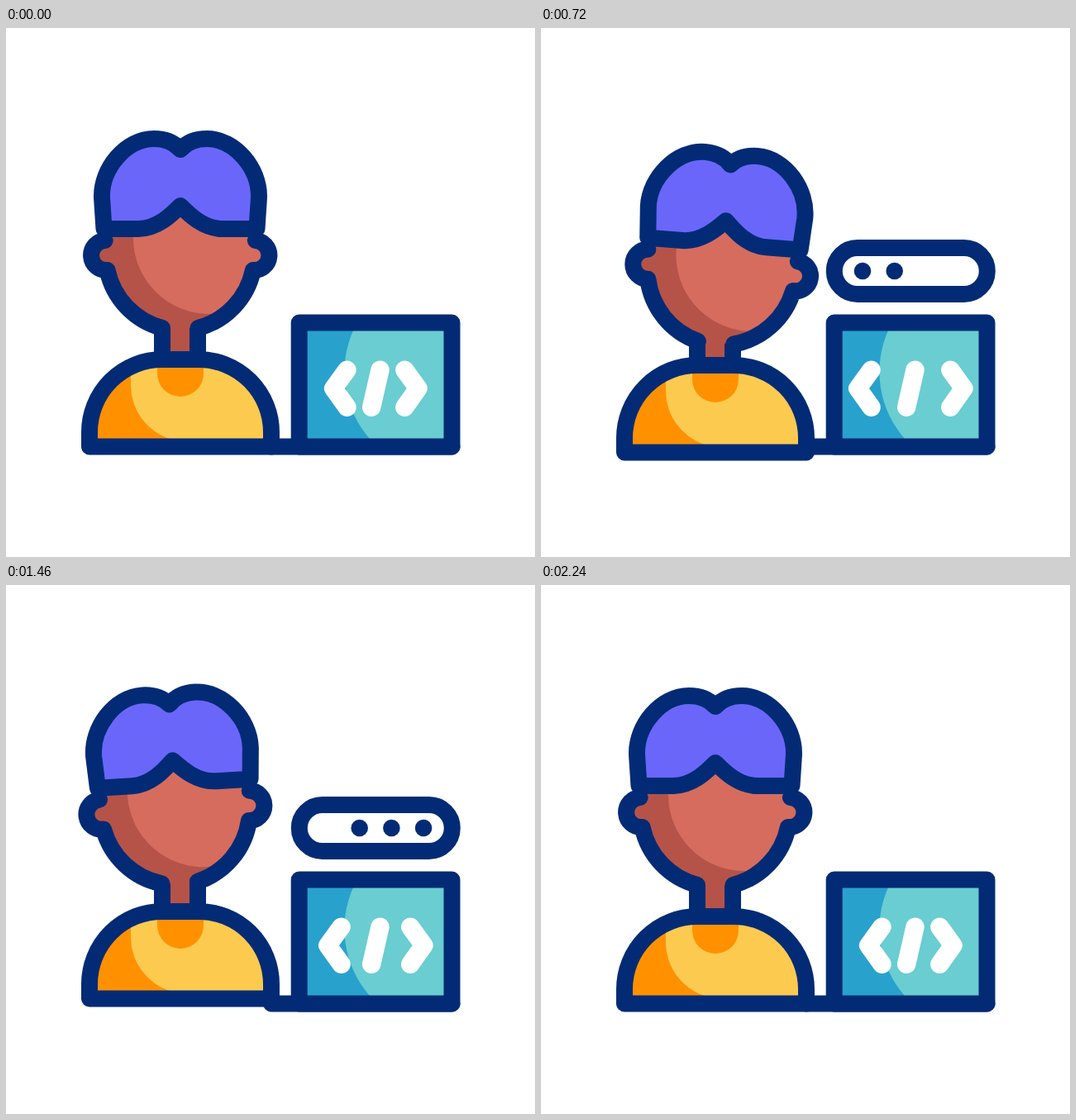
Write an HTML page that moves like this. It is 640 px wide and 640 px high and loops after 2400 ms.

```html
<!DOCTYPE html>
<html lang="en">
<head>
<meta charset="utf-8">
<title>Programmer</title>
<style>
  html, body { margin: 0; width: 100%; height: 100%; overflow: hidden; background: #fff; }
  svg { display: block; width: 100%; height: 100%; }
  .line { fill: none; stroke: #032b75; stroke-width: 20; stroke-linecap: round; stroke-linejoin: round; }
  .code { fill: none; stroke: #fff; stroke-width: 22.4; stroke-linecap: round; stroke-linejoin: round; }
</style>
</head>
<body>
<svg viewBox="0 0 640 640">
  <defs>
    <path id="face" d="M119.7 257A18 18 0 0 0 122.6 293A92 92 0 0 0 189 363H232.5A92 92 0 0 0 298.9 293A18 18 0 0 0 301.8 257V243H262L211 215L160 243H119.7Z"/>
    <path id="torso" d="M101 506.5V489A88 88 0 0 1 189 401H233A88 88 0 0 1 321 489V506.5Z"/>
    <clipPath id="faceClip"><use href="#face"/></clipPath>
  </defs>

  <g id="neck">
    <path fill="#b65348" d="M189 358H232V404H189Z"/>
    <path class="line" d="M189 365V402M232 365V402"/>
  </g>

  <g id="head">
    <use href="#face" fill="#b65348"/>
    <circle cx="246" cy="254" r="92" fill="#d66c5e" clip-path="url(#faceClip)"/>
    <path class="line" d="M119.7 257A18 18 0 0 0 122.6 293A92 92 0 0 0 189 363M301.8 257A18 18 0 0 1 298.9 293A92 92 0 0 1 232.5 363"/>
    <path class="line" style="fill:#6a66fa" d="M118.500 243L116 205C115 170 145 134 179 134C191 134 203 138 211 147C219 138 231 134 243 134C277 134 307 170 306 205L303.500 243H262C238 243 220 224 211 215C202 224 184 243 160 243Z"/>
  </g>

  <path class="line" d="M321 506.500H539.500"/>

  <g id="body">
    <use href="#torso" fill="#fdca50"/>
    <path fill="#ff9100" d="M101 506V489A88 88 0 0 1 151 410V432A68 68 0 0 0 198 497V506ZM183 405V418A28 28 0 0 0 239 418V405Z"/>
    <use href="#torso" class="line"/>
  </g>

  <path fill="#69cdd1" d="M355 356H540V506H355Z"/>
  <path fill="#29a1cd" d="M355 366H420A123 123 0 0 0 440 497H355Z"/>
  <path class="line" d="M354.700 356.500H539.500V506.500H354.700Z"/>
  <path class="code" id="less" d="M412.500 413.700L396.200 436L412.500 458.800"/>
  <path class="code" d="M452.500 413.700L442.200 458.800"/>
  <path class="code" id="more" d="M482.300 413.700L498.500 436L482.300 458.800"/>

  <rect class="line" id="pill" style="fill:#fff"/>
  <g id="dots" fill="#032b75">
    <circle cx="389" cy="294" r="10.300"/>
    <circle cx="427.700" cy="294" r="10.300"/>
    <circle cx="466.400" cy="294" r="10.300"/>
    <circle cx="505.100" cy="294" r="10.300"/>
  </g>
</svg>
<script>
  const LOOP = 2400, STEP = 20, START = 200, END = 2200;
  const SWAY = [START, 600, 1200, 1800, END];
  const SPREAD = [START, 700, 1200, 1700, END];
  const get = id => document.getElementById(id);
  const [neck, head, body, less, more, pill] =
    ["neck", "head", "body", "less", "more", "pill"].map(get);
  const dots = [...get("dots").children];

  // Smoothly eased value between keyed times
  function track(t, times, values) {
    if (t <= times[0]) return values[0];
    const i = times.findIndex(k => t < k);
    if (i < 0) return values[values.length - 1];
    const p = (t - times[i - 1]) / (times[i] - times[i - 1]);
    return values[i - 1] + (values[i] - values[i - 1]) * p * p * (3 - 2 * p);
  }

  function move(el, x, y, extra = "") {
    el.setAttribute("transform", `translate(${x} ${y}) ${extra}`);
  }

  function draw(t) {
    const headY = track(t, SWAY, [0, 22, -19.6, 22, 0]);
    const tilt = track(t, SWAY, [0, 6.3, -9.9, 6.3, 0]);
    move(body, 0, track(t, SWAY, [0, 9.7, -16.7, 9.7, 0]));
    move(neck, 0, headY);
    move(head, 0, headY, `rotate(${tilt} 210.75 373)`);

    const gap = track(t, SPREAD, [0, 13, 0, 13, 0]);
    move(less, -gap, 0);
    move(more, gap, 0);

    const s = track(t, SWAY, [0, 1, 1, 1, 0]);
    const box = { x: 447.3 - 92.5 * s, y: 234 + 32 * s, width: 185 * s, height: 56 * s, rx: 28 * s };
    for (const key in box) pill.setAttribute(key, box[key]);
    pill.style.display = s > 0 ? "" : "none";

    dots.forEach((dot, i) => {
      const shown = t >= 600 + 100 * i && t < 1400 + 100 * i;
      dot.style.display = shown ? "" : "none";
    });
  }

  const began = performance.now();
  function tick() {
    const t = (performance.now() - began) % LOOP;
    draw(Math.floor(t / STEP) * STEP);
    requestAnimationFrame(tick);
  }
  tick();
</script>
</body>
</html>
```
